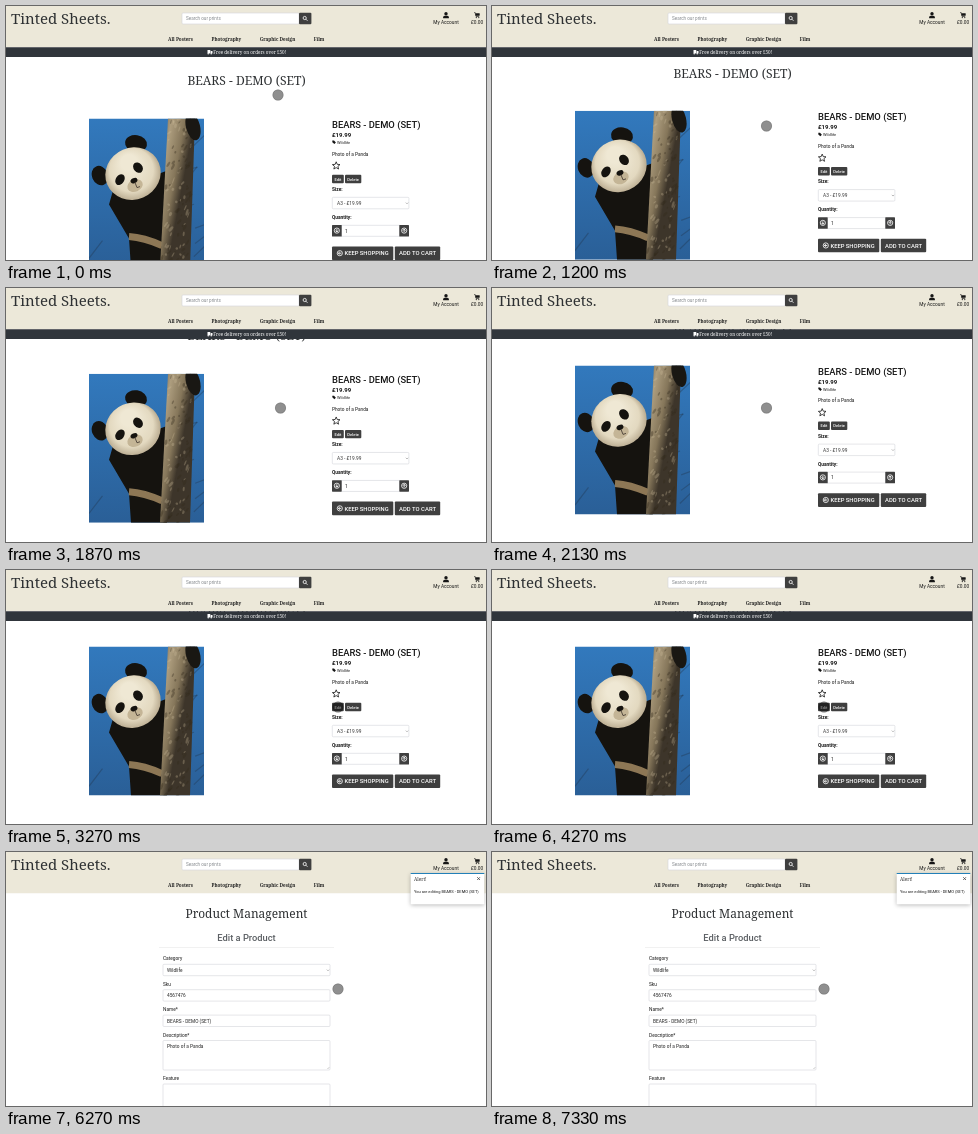
An HTML page with a canvas that plays this animation: 480 px wide and 254 px high, repeating every 7740 ms.

```html
<!DOCTYPE html>
<html lang="en">
<head>
<meta charset="utf-8">
<title>Print shop: edit a product</title>
<style>
html, body { margin: 0; width: 100%; height: 100%; overflow: hidden; background: #fff; }
canvas { display: block; width: 480px; height: 254px; }
</style>
</head>
<body>
<canvas id="stage" width="480" height="254"></canvas>
<script>
const ctx = document.getElementById('stage').getContext('2d');
const LOOP = 7740;
const PAGE_SWAP = 4530, ALERT_IN = 4730, ALERT_DONE = 4930;
const SHOP = 'Tinted Sheets.';
const PRODUCT = 'BEARS - DEMO (SET)';
const SANS = 'Roboto, sans-serif';
const SERIF = '"Noto Serif", serif';
const INK = '#161616', SLATE = '#2e3133', DARK = '#3f3f3f', LINE = '#d3d6da';
const TAU = Math.PI * 2;

const mix = (a, b, u) => a + (b - a) * u;
const ramp = (t, start, end) => Math.min(1, Math.max(0, (t - start) / (end - start)));
const smooth = u => u * u * (3 - 2 * u);

// The wheel moves the page in three bursts, then settles.
function scrollAt(t) {
  return 7.7 * ramp(t, 1000, 1200) + 10.4 * ramp(t, 1200, 1600)
    + 17.1 * ramp(t, 1600, 2130) + 0.8 * ramp(t, 2130, 2600);
}

function cursorAt(t) {
  const down = smooth(ramp(t, 70, 730)), across = smooth(ramp(t, 2130, 2870));
  return [272 + 2.5 * down + 57.5 * across, 89 + 31 * down + 17 * across];
}

function seeded(seed) {
  return () => (seed = seed * 16807 % 2147483647) / 2147483647;
}

// yc is the middle of the capital letters
function text(str, x, yc, size, { font = SANS, weight = 400, color = INK, align = 'left' } = {}) {
  ctx.font = `${weight} ${size}px ${font}`;
  ctx.textAlign = align;
  ctx.fillStyle = color;
  ctx.fillText(str, x, yc + size * 0.356);
  return ctx.measureText(str).width;
}

function box(x, y, w, h, fill, r = 0, stroke) {
  ctx.beginPath();
  ctx.roundRect(x, y, w, h, r);
  ctx.fillStyle = fill;
  ctx.fill();
  if (stroke) {
    ctx.strokeStyle = stroke;
    ctx.lineWidth = 0.6;
    ctx.stroke();
  }
}

function oval(x, y, rx, ry, fill, turn = 0) {
  ctx.beginPath();
  ctx.ellipse(x, y, rx, ry, turn, 0, TAU);
  ctx.fillStyle = fill;
  ctx.fill();
}

function ring(x, y, r, color, width) {
  ctx.beginPath();
  ctx.arc(x, y, r, 0, TAU);
  ctx.strokeStyle = color;
  ctx.lineWidth = width;
  ctx.stroke();
}

function poly(fill, ...p) {
  ctx.beginPath();
  for (let i = 0; i < p.length; i += 2) ctx.lineTo(p[i], p[i + 1]);
  ctx.fillStyle = fill;
  ctx.fill();
}

function line(color, width, ...p) {
  ctx.beginPath();
  for (let i = 0; i < p.length; i += 2) ctx.lineTo(p[i], p[i + 1]);
  ctx.strokeStyle = color;
  ctx.lineWidth = width;
  ctx.stroke();
}

const chevron = (x, y) => line('#888', 0.6, x - 1.2, y - 0.6, x, y + 0.6, x + 1.2, y - 0.6);

function arrowIcon(x, y, turn) {
  ctx.save();
  ctx.translate(x, y);
  ctx.rotate(turn);
  ring(0, 0, 2.6, '#fff', 0.8);
  line('#fff', 0.9, -1.4, 0, 1.5, 0);
  line('#fff', 0.9, 0, -1.4, -1.4, 0, 0, 1.4);
  ctx.restore();
}

function header() {
  box(0, 0, 480, 41.3, '#ece8d9');
  text(SHOP, 5, 12.4, 15, { font: SERIF, weight: 500, color: SLATE });

  box(176, 7, 117, 11, '#fff', 1, LINE);
  text('Search our prints', 180, 12.6, 4.6, { color: '#85898d' });
  box(293, 6.8, 12.4, 11.4, DARK, 1);
  ring(298.7, 12, 1.6, '#fff', 0.8);
  line('#fff', 0.9, 299.9, 13.2, 301.4, 14.7);

  oval(440, 7.7, 1.7, 1.8, INK);
  box(437.1, 9.7, 5.8, 2.6, INK, [1.6, 1.6, 0.4, 0.4]);
  text('My Account', 440, 16, 4.8, { align: 'center' });
  line(INK, 0.7, 468.2, 6.6, 469.2, 6.6, 470, 10.4, 473.2, 10.4);
  box(469.5, 7.2, 4.2, 2.5, INK, 0.4);
  for (const x of [470.3, 472.8]) oval(x, 11.6, 0.6, 0.6, INK);
  text('£0.00', 471, 16, 4.8, { align: 'center' });

  let x = 162;
  for (const name of ['All Posters', 'Photography', 'Graphic Design', 'Film']) {
    x += text(name, x, 33.6, 4.6, { font: SERIF, weight: 600, color: '#222' }) + 18.5;
  }
}

function deliveryBar() {
  box(0, 41.3, 480, 9.8, '#30353b');
  box(201.5, 44, 2.8, 3.4, '#fff');
  box(204.6, 45, 1.9, 2.4, '#fff', 0.5);
  for (const x of [202.2, 205.2]) oval(x, 47.8, 0.7, 0.7, '#fff');
  text('Free delivery on orders over £50!', 207.3, 46.4, 4.6, { font: SERIF, weight: 500, color: '#fff' });
}

function panda() {
  const black = '#15130f', cream = '#e3d9c0';
  poly(black, 24, 72, 20, 86, 40, 120, 42, 149, 78, 149, 84, 50);
  ctx.beginPath();
  ctx.moveTo(40, 118);
  ctx.quadraticCurveTo(55, 119, 73, 127);
  ctx.strokeStyle = '#8d7755';
  ctx.lineWidth = 7;
  ctx.stroke();

  oval(11, 57, 8, 10, black, -0.4);
  oval(47, 25, 11, 8.5, black, 0.15);
  const fur = ctx.createRadialGradient(40, 44, 8, 44, 56, 31);
  fur.addColorStop(0, '#efe8d4');
  fur.addColorStop(0.6, cream);
  fur.addColorStop(1, '#a6967a');
  oval(44, 55, 28, 26, fur, -0.4);
  oval(46, 67, 8, 6, '#c4b596', -0.4);
  oval(31, 61, 4.2, 5.8, black, 0.6);
  oval(49, 49, 4.4, 5.6, black, -0.7);
  oval(45, 62, 3.6, 2.5, black, -0.4);
  line('#4a4036', 0.9, 46, 64, 48, 69, 51, 68);
}

function trunk() {
  const bark = ctx.createLinearGradient(73, 0, 105, 6);
  bark.addColorStop(0, '#6d5e47');
  bark.addColorStop(0.3, '#ad9d7e');
  bark.addColorStop(0.7, '#85765a');
  bark.addColorStop(1, '#3d352a');
  poly(bark, 79, 0, 106, 0, 101, 149, 71, 149);

  const rnd = seeded(41);
  for (let i = 0; i < 110; i++) {
    const y = rnd() * 149, x = mix(80, 72, y / 149) + rnd() * 26;
    oval(x, y, 0.5 + rnd(), 1 + rnd() * 2.5, rnd() < 0.5 ? 'rgba(50,40,28,.35)' : 'rgba(205,190,155,.3)', rnd());
  }
  oval(104, 8, 7, 14, '#191713', -0.25);
}

function picture(x, y) {
  ctx.save();
  ctx.translate(x, y);
  ctx.beginPath();
  ctx.rect(0, 0, 115, 149);
  ctx.clip();
  const sky = ctx.createLinearGradient(0, 0, 0, 149);
  sky.addColorStop(0, '#3279bd');
  sky.addColorStop(1, '#2a5f97');
  box(0, 0, 115, 149, sky);
  const rnd = seeded(7);
  for (let i = 0; i < 14; i++) {
    const bx = rnd() * 115, by = 20 + rnd() * 130;
    line('rgba(32,50,70,.35)', 1.2, bx, by, bx + 10 + rnd() * 12, by - 24 + rnd() * 30);
  }
  panda();
  trunk();
  ctx.restore();
}

function star(x, y) {
  ctx.beginPath();
  for (let i = 0; i < 10; i++) {
    const a = i * TAU / 10 - TAU / 4, r = i % 2 ? 1.8 : 4;
    ctx.lineTo(x + r * Math.cos(a), y + r * Math.sin(a));
  }
  ctx.closePath();
  ctx.strokeStyle = INK;
  ctx.lineWidth = 0.8;
  ctx.stroke();
}

function button(label, x, y, w, h, size, inset = 0) {
  box(x, y, w, h, DARK, 1);
  text(label, x + (w + inset) / 2, y + h / 2 + 0.1, size, { color: '#fff', weight: 500, align: 'center' });
}

function productPage(scroll) {
  ctx.save();
  ctx.translate(0, -scroll);
  text(PRODUCT, 240.5, 75, 12.1, { font: SERIF, align: 'center', color: SLATE });
  picture(83, 112.6);

  text(PRODUCT, 326, 118.4, 9.4, { weight: 500 });
  text('£19.99', 326, 128.6, 6, { weight: 700 });
  poly(INK, 326.3, 134.6, 328, 134.6, 329.9, 136.6, 328.4, 138.1, 326.3, 136.2);
  text('Wildlife', 331, 136.4, 4);
  text('Photo of a Panda', 326, 148, 4.75);
  star(330.2, 159.8);
  button('Edit', 326, 168.8, 11.8, 8.4, 4.1);
  button('Delete', 339, 168.8, 16.3, 8.4, 4.1);

  text('Size:', 326, 183.5, 4.8, { weight: 700 });
  box(326.3, 191.3, 76.6, 11.5, '#fff', 1, LINE);
  text('A3 - £19.99', 331, 197.3, 4.8, { color: '#333' });
  chevron(401, 197.2);

  text('Quantity:', 326, 211.2, 4.8, { weight: 700 });
  box(335, 219.3, 59, 11, '#fff', 0, LINE);
  for (const [x, turn] of [[326, -TAU / 4], [393.3, TAU / 4]]) {
    box(x, 219, 9.7, 11.5, DARK, 0.6);
    arrowIcon(x + 4.85, 224.6, turn);
  }
  text('1', 339, 224.9, 4.8);

  button('KEEP SHOPPING', 326, 240.4, 61.3, 13.7, 5.8, 7.8);
  arrowIcon(333.8, 247.2, 0);
  button('ADD TO CART', 388.8, 240.4, 45.4, 13.7, 5.9);
  ctx.restore();
}

function formPage() {
  text('Product Management', 240.5, 61.8, 11.9, { font: SERIF, align: 'center', color: SLATE });
  text('Edit a Product', 240.5, 85.6, 9.3, { weight: 500, align: 'center', color: '#5c6064' });
  line('#e8e8e8', 0.6, 153, 95.5, 328, 95.5);

  let top = 112.3;
  const fields = { Category: 'Wildlife', Sku: '4567476', 'Name*': PRODUCT, 'Description*': 'Photo of a Panda', Feature: '' };
  for (const [label, value] of Object.entries(fields)) {
    const height = top > 180 ? 29.5 : 11.4;
    text(label, 157, top - 5.7, 4.8);
    box(157, top, 167, height, '#fff', 1, LINE);
    text(value, 161, top + 6, 4.75, { color: '#222' });
    top += height + 14;
  }
  chevron(322, 118.2);
  line('#888', 0.5, 321.5, 217, 323.2, 215.3);
}

function alertCard(alpha) {
  ctx.save();
  ctx.globalAlpha = alpha;
  ctx.shadowColor = 'rgba(0,0,0,.28)';
  ctx.shadowBlur = 4;
  ctx.shadowOffsetY = 1;
  box(404.7, 21.3, 73.6, 31, '#fff', 0.8);
  ctx.shadowColor = 'transparent';
  box(404.7, 20.9, 73.6, 1.2, '#2380b8');
  text('Alert!', 408, 27.6, 4.7, { font: SERIF, color: '#333' });
  for (const s of [-1.4, 1.4]) line('#444', 0.8, 472.6 - s, 25.2, 472.6 + s, 28);
  text('You are editing ' + PRODUCT, 408, 39.4, 4);
  ctx.restore();
}

function cursor([x, y]) {
  oval(x, y, 5.5, 5.5, 'rgba(0,0,0,.44)');
  ring(x, y, 5.2, 'rgba(0,0,0,.16)', 0.7);
}

function draw(t) {
  box(0, 0, 480, 254, '#fff');
  if (t < PAGE_SWAP) productPage(scrollAt(t));
  else formPage();
  header();
  if (t < ALERT_IN) deliveryBar();
  else alertCard(mix(0.25, 1, ramp(t, ALERT_IN, ALERT_DONE)));
  cursor(cursorAt(t));
}

function tick() {
  draw(performance.now() % LOOP);
  requestAnimationFrame(tick);
}
tick();
</script>
</body>
</html>
```
